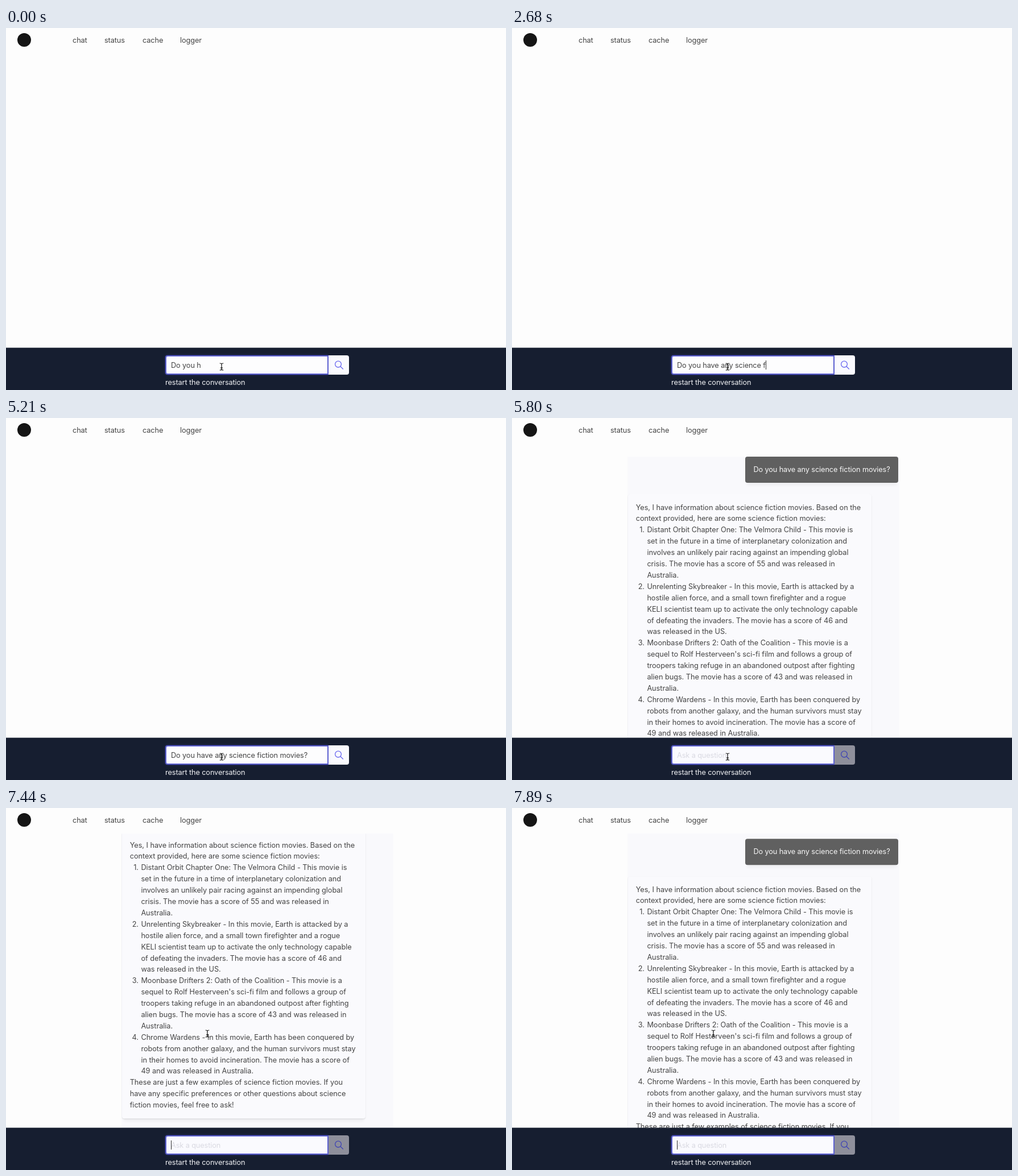
An HTML page for the animation above (8 s loop, 879 by 637 pixels).

```html
<!DOCTYPE html>
<html lang="en">
<head>
<meta charset="utf-8">
<title>Movie chat</title>
<style>
  html, body { margin: 0; width: 100%; height: 100%; overflow: hidden; }
  body {
    position: relative; background: #fdfdfd; color: #454545;
    font: 12.75px/19.886px Inter, "Open Sans", sans-serif;
    letter-spacing: -.12px; white-space: pre;
  }
  body * { position: absolute; box-sizing: border-box; }
  nav { left: 0; top: 11.5px; }
  .logo { left: 20px; top: -2.5px; width: 24px; height: 24px; border-radius: 50%; background: #151515; }

  #chat { left: 0; top: 45px; width: 879px; height: 518px; overflow: hidden; }
  #panel { left: 203px; width: 478px; bottom: 0; background: #f9f9fc; }
  #scroll { left: 0; top: 0; width: 100%; height: 0; }
  .question {
    left: 410px; top: 22.5px; width: 269px; height: 46.5px; padding: 13.3px 0;
    border-radius: 4px; background: #606060; color: #f6f6f6; text-align: center;
    box-shadow: 0 8px 5px -3px rgba(0, 0, 0, .04);
  }
  #answer {
    left: 204px; top: 89.3px; width: 428px; height: 504px; border-radius: 4px;
    background: #fafafd; letter-spacing: -.055px;
    box-shadow: 0 1px 2px rgba(0, 0, 0, .12), 0 8px 5px -3px rgba(0, 0, 0, .04);
  }
  .flow { left: 13.7px; top: 13.3px; }
  .flow p, .flow li, .flow ol { position: relative; margin: 0; padding: 0; list-style: none; }
  .flow li { padding-left: 19.7px; }
  .flow li b { left: 0; width: 15.3px; text-align: right; font-weight: 400; }

  footer {
    left: 0; top: 563px; width: 879px; height: 74px; background: #161e30;
    box-shadow: 0 -1px rgba(22, 30, 48, .4);
  }
  #field {
    left: 280px; top: 13px; width: 287px; height: 34px; background: #fdfdfe;
    border: 2px solid #5c60d0; border-radius: 4px 0 0 4px;
    box-shadow: 0 0 3px rgba(70, 75, 215, .6);
  }
  #button {
    left: 567px; top: 13px; width: 36px; height: 33.5px; border-radius: 0 4px 4px 0;
    background: #fafafe; color: #6a68f0;
  }
  #button svg { left: 10px; top: 9px; }
  .line { left: 290px; top: 20.5px; }
  .line span { position: static; }
  #hint { color: #dadae2; }
  #caret { left: 100%; top: 1.5px; width: 1px; height: 16px; background: #333; }
  .restart { left: 280px; top: 50.5px; color: #f1f2f5; }
  .sent #field { background: #fafafe; }
  .sent #button { background: #8e8f9b; color: #4045b4; }
  #pointer { left: 0; top: 0; overflow: visible; }
</style>
</head>
<body>
<nav><i class="logo"></i><span style="left:117px">chat</span><span style="left:173px">status</span><span style="left:240px">cache</span><span style="left:306px">logger</span></nav>

<div id="chat"><div id="panel"></div><div id="scroll"><div class="question">Do you have any science fiction movies?</div><div id="answer"><div class="flow"><p>Yes, I have information about science fiction movies. Based on the
context provided, here are some science fiction movies:</p><ol><li><b>1.</b>Distant Orbit Chapter One: The Velmora Child - This movie is
set in the future in a time of interplanetary colonization and
involves an unlikely pair racing against an impending global
crisis. The movie has a score of 55 and was released in
Australia.</li><li><b>2.</b>Unrelenting Skybreaker - In this movie, Earth is attacked by a
hostile alien force, and a small town firefighter and a rogue
KELI scientist team up to activate the only technology capable
of defeating the invaders. The movie has a score of 46 and
was released in the US.</li><li><b>3.</b>Moonbase Drifters 2: Oath of the Coalition - This movie is a
sequel to Rolf Hesterveen's sci-fi film and follows a group of
troopers taking refuge in an abandoned outpost after fighting
alien bugs. The movie has a score of 43 and was released in
Australia.</li><li><b>4.</b>Chrome Wardens - In this movie, Earth has been conquered by
robots from another galaxy, and the human survivors must stay
in their homes to avoid incineration. The movie has a score of
49 and was released in Australia.</li></ol><p>These are just a few examples of science fiction movies. If you
have any specific preferences or other questions about science
fiction movies, feel free to ask!</p></div></div></div></div>

<footer><div id="field"></div><div id="button"><svg width="17" height="17" viewBox="0 0 17 17" fill="none" stroke="currentColor" stroke-width="1.3" stroke-linecap="round"><circle cx="7" cy="6.6" r="5.4"/><path d="M10.9 10.5 15.4 15"/></svg></div><div class="line" id="hint">Ask a question</div><div class="line"><span id="typed"></span><i id="caret"></i></div><div class="restart">restart the conversation</div></footer>

<svg id="pointer" width="8" height="14" fill="none" stroke-linecap="round">
  <path id="beam" d="M-2.8-6Q-.4-6 0-4.8Q.4-6 2.8-6M0-4.8V4.8M-2.8 6Q-.4 6 0 4.8Q.4 6 2.8 6M-1.5 2.2H1.5" stroke="#111" stroke-width="1.2"/>
</svg>

<script>
  const $ = id => document.getElementById(id);
  const LOOP = 8000, TICK = 148.7;      // the screen refreshes once per tick
  const SEND = 38, REPLY = 39, IDLE = 4, BLINK = 43;
  const REACH = 91.6;                   // scroll distance to the end of the answer
  const query = "Do you have any science fiction movies?";

  // bursts of typing with pauses between: [tick, characters]
  const keys = [[0, 8], [4, 14], [5, 14], [10, 20], [11, 20], [14, 24], [17.3, 24], [21, 27], [22, 27], [29, 37], [31, 39]];

  const ramp = (n, a, b) => Math.min(1, Math.max(0, (n - a) / (b - a)));
  const ease = u => u * u * (3 - 2 * u);
  const mix = (a, b, u) => a + (b - a) * u;
  const show = (id, on) => { $(id).style.visibility = on ? "visible" : "hidden"; };

  function typed(n) {
    let count = keys[0][1];
    for (let i = 1; i < keys.length; i++) {
      const [a, from] = keys[i - 1], [b, to] = keys[i];
      count += (to - from) * ramp(n, a, b);
    }
    return Math.round(count);
  }

  function caretOn(n) {
    if (n < SEND) return typed(n) > typed(n - IDLE);
    return n >= BLINK && (n - BLINK) % 7 < IDLE;
  }

  function draw(now) {
    const n = Math.floor(now % LOOP / TICK), sent = n >= SEND;
    document.body.classList.toggle("sent", sent);
    $("typed").textContent = sent ? "" : query.slice(0, typed(n));
    show("caret", caretOn(n));
    for (const id of ["hint", "panel", "scroll"]) show(id, sent);
    show("answer", n >= REPLY);

    const y = REACH * (ease(ramp(n, 50, 53.97)) - ease(ramp(n, REPLY, 41)));
    $("panel").style.top = (n > REPLY ? 0 : 22.5) + "px";
    $("scroll").style.transform = `translateY(${y}px)`;

    const u = ease(ramp(n, 46, 48));
    $("beam").setAttribute("transform", `translate(${mix(379, 354, u)} ${mix(596, 397, u)})`);
    requestAnimationFrame(draw);
  }
  draw(performance.now());
</script>
</body>
</html>
```
